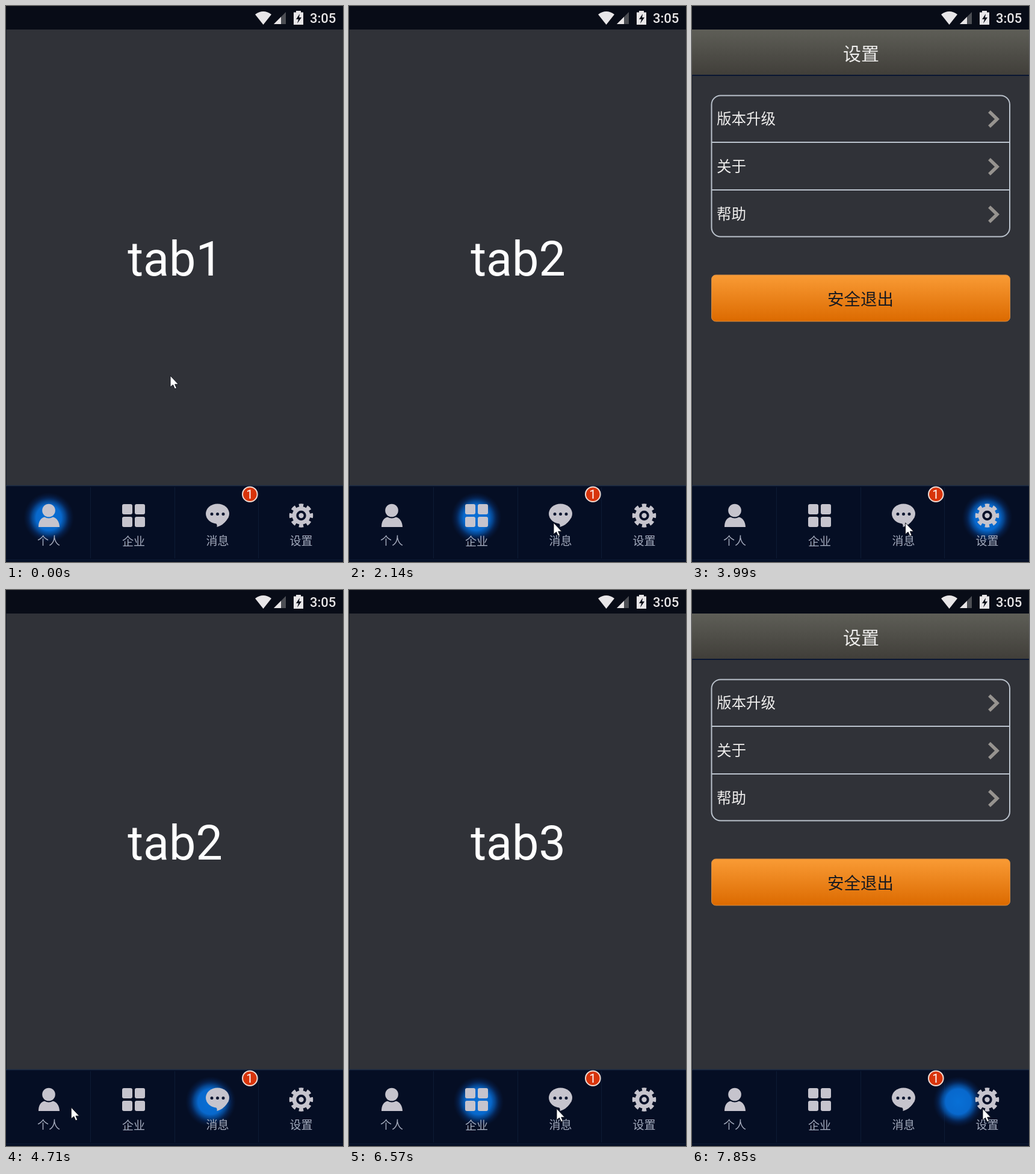
Write an HTML page that moves like this. It is 560 px wide and 922 px high and loops after 7990 ms.

```html
<!DOCTYPE html>
<html lang="zh-CN">
<head>
<meta charset="utf-8">
<title>Tab bar</title>
<style>
html, body { margin: 0; width: 100%; height: 100%; overflow: hidden; background: #303238; }
svg { display: block; width: 100%; height: 100%; }
text { font-family: Roboto, "Noto Sans CJK SC", "Noto Sans CJK", sans-serif; }
.cjk text { font-family: "Noto Sans CJK SC", "Noto Sans CJK", sans-serif; }
#settings text { font-weight: 500; }
.mid { text-anchor: middle; }
</style>
</head>
<body>
<svg viewBox="0 0 560 922" preserveAspectRatio="none">
  <defs>
    <radialGradient id="glowFill">
      <stop offset="0" stop-color="#0870d6"/>
      <stop offset=".5" stop-color="#0868cc"/>
      <stop offset=".66" stop-color="#064c9c" stop-opacity=".85"/>
      <stop offset=".8" stop-color="#06357a" stop-opacity=".45"/>
      <stop offset="1" stop-color="#062050" stop-opacity="0"/>
    </radialGradient>
    <linearGradient id="titleFill" x2="0" y2="1">
      <stop stop-color="#5e5e57"/>
      <stop offset="1" stop-color="#403e39"/>
    </linearGradient>
    <linearGradient id="buttonFill" x2="0" y2="1">
      <stop stop-color="#f99b35"/>
      <stop offset="1" stop-color="#dc6a00"/>
    </linearGradient>
  </defs>

  <rect width="560" height="922" fill="#303238"/>
  <rect width="1" height="922" fill="#161c28"/>
  <text id="pageName" class="mid" x="281" y="447" font-size="79" fill="#fff"></text>

  <g id="settings" class="cjk" fill="#eeedec">
    <rect y="39" width="560" height="76" fill="url(#titleFill)"/>
    <rect y="114" width="560" height="2" fill="#0a1632"/>
    <text class="mid" x="281" y="90" font-size="30">设置</text>
    <g fill="none" stroke="#bac2cc" stroke-width="2">
      <rect x="32.5" y="148.5" width="495.500" height="234" rx="15"/>
      <path d="M33 226H528M33 305H528"/>
    </g>
    <g font-size="24.5">
      <text x="41" y="196">版本升级</text>
      <text x="41" y="275">关于</text>
      <text x="41" y="354">帮助</text>
    </g>
    <path d="M494 175l13 12.500-13 12.500M494 254l13 12.500-13 12.500M494 333l13 12.500-13 12.500"
      fill="none" stroke="#96938f" stroke-width="5.500"/>
    <rect x="32.500" y="446" width="496" height="77" rx="7" fill="url(#buttonFill)" stroke="#d08b45"/>
    <text class="mid" x="280" y="496" font-size="27.500" fill="#181a20">安全退出</text>
  </g>

  <rect width="560" height="39" fill="#080c17"/>
  <g fill="#e8e6e8">
    <path d="M427.500 31L414 14Q427.500 4 441 14Z"/>
    <path d="M445 30H465V10Z" fill="#4c4e54"/>
    <path d="M445 30H457V18Z"/>
    <path d="M482 8h8v2.500h4V31H478V10.500h4Z"/>
    <path d="M488 13l-6 9h4l-2 7 7-10h-4Z" fill="#080c17"/>
    <text x="505" y="28" font-size="22" font-weight="500">3:05</text>
  </g>

  <rect y="795" width="560" height="127" fill="#050e24"/>
  <path d="M0 795.500H560" stroke="#1b2b46" stroke-width="1.500"/>
  <path d="M140.500 798V916M280.500 798V916M419.500 798V916M0 918.500H560" stroke="#0d1b35"/>
  <circle id="glow" cy="848.500" r="42" fill="url(#glowFill)"/>

  <g fill="#c6c4cd">
    <circle cx="71" cy="836.500" r="10.800"/>
    <path d="M54 864Q54 850 64 847.500Q71 851.500 78 847.500Q88 850 89 864Z"/>
    <path id="grid"/>
    <ellipse cx="351.500" cy="842" rx="19.500" ry="16.500"/>
    <path d="M345 856Q352 858 350.500 864Q361 861 367 852Z"/>
    <path d="M342 842.500h.01M351.500 842.500h.01M361 842.500h.01" stroke="#0a1630" stroke-width="5" stroke-linecap="round"/>
    <circle cx="490.500" cy="845" r="15"/>
    <circle cx="490.500" cy="845" r="16.500" pathLength="16" fill="none" stroke="#c6c4cd"
      stroke-width="6.500" stroke-dasharray="1.1 .9" stroke-dashoffset=".55"/>
    <circle cx="490.500" cy="845" r="6.200" stroke="#071028" stroke-width="4"/>
  </g>
  <g class="cjk mid" font-size="19" fill="#a4abbd">
    <text x="71" y="894">个人</text>
    <text x="212" y="895">企业</text>
    <text x="351.500" y="894">消息</text>
    <text x="490.500" y="894">设置</text>
  </g>

  <circle cx="405.300" cy="809.700" r="12.300" fill="#d8340a" stroke="#efdcd4" stroke-width="2"/>
  <text class="mid" x="404.800" y="817" font-size="20" fill="#fff">1</text>

  <path id="cursor" d="M0 0V19L4.500 15.200 7.500 22 10.500 20.600 7.700 14.300H13.500Z" fill="#fff" stroke="#10131c"/>
</svg>
<script>
const LOOP = 7990, FPS = 7;
const GLOW_DELAY = 40, GLOW_TIME = 300;
const tabX = [71, 211.5, 351, 490.5];

// [time, tab]
const clicks = [[-1000, 0], [1050, 1], [2250, 2], [3250, 3], [3900, 2],
  [4620, 1], [5030, 0], [5820, 1], [6500, 2], [7637, 3]];

// [time, x, y] of the pointer tip
const pointer = [[0, 273, 613], [300, 273, 613], [950, 215, 858], [1500, 215, 858],
  [2140, 340, 857], [2500, 345, 857], [3200, 498, 855], [3400, 498, 855],
  [3900, 352, 857], [4150, 352, 857], [4887, 72, 858], [5250, 72, 858],
  [5750, 237, 860], [5900, 237, 860], [6450, 345, 860], [6700, 345, 860],
  [7140, 464, 860], [7500, 483, 860], [LOOP, 483, 860]];

const $ = id => document.getElementById(id);
const ease = u => (1 - Math.cos(Math.PI * Math.min(1, Math.max(0, u)))) / 2;
const mix = (a, b, u) => a + (b - a) * u;
const lastBefore = (list, t) => list.findLastIndex(item => item[0] <= t);

const tile = (x, y) => `M${x + 3} ${y}h11q3 0 3 3v11q0 3-3 3h-11q-3 0-3-3v-11q0-3 3-3Z`;
$('grid').setAttribute('d', tile(193, 826) + tile(214, 826) + tile(193, 847) + tile(214, 847));

function draw(t) {
  const i = lastBefore(clicks, t);
  const [clickedAt, tab] = clicks[i];
  const from = tabX[i ? clicks[i - 1][1] : tab];
  const moved = ease((t - clickedAt - GLOW_DELAY) / GLOW_TIME);
  $('glow').setAttribute('cx', mix(from, tabX[tab], moved));

  $('settings').style.display = tab === 3 ? '' : 'none';
  $('pageName').textContent = tab === 3 ? '' : 'tab' + (tab + 1);
  // Page names share one left edge, set by the widest of them.
  $('pageName').setAttribute('x', 281);

  const k = Math.min(lastBefore(pointer, t), pointer.length - 2);
  const [t0, x0, y0] = pointer[k], [t1, x1, y1] = pointer[k + 1];
  const u = ease((t - t0) / (t1 - t0));
  $('cursor').setAttribute('transform', `translate(${mix(x0, x1, u)} ${mix(y0, y1, u)})`);
}

function tick() {
  const t = performance.now() % LOOP;
  // The picture advances in steps; the small offset absorbs rounding of the step times.
  draw(Math.floor((t + 8) * FPS / 1000) * 1000 / FPS);
  requestAnimationFrame(tick);
}
tick();
</script>
</body>
</html>
```
